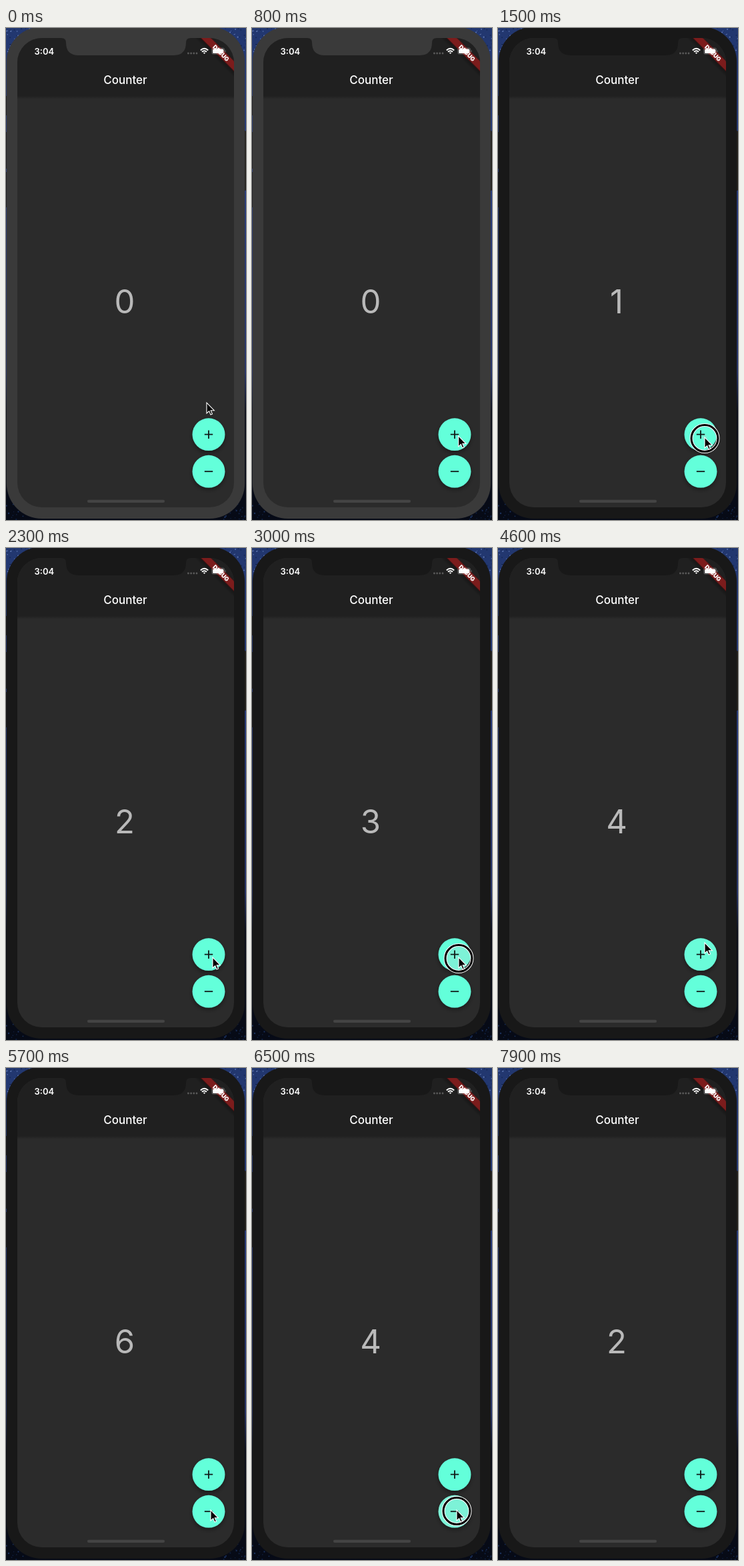
Recreate the animation shown at these times as an HTML page. Size 360 px wide and 738 px high, loop 8000 ms.

```html
<!DOCTYPE html>
<html lang="en">
<head>
<meta charset="utf-8">
<title>Counter</title>
<style>
  html, body { margin: 0; width: 100%; height: 100%; overflow: hidden; background: #050710; }
  svg { display: block; width: 100vw; height: 100vh; font-family: Inter, Roboto, sans-serif; }
  text { fill: #fff; text-anchor: middle; }
</style>
</head>
<body>
<svg viewBox="0 0 360 738">
  <defs>
    <linearGradient id="sky" x2="0" y2="1">
      <stop offset="0" stop-color="#22376f"/>
      <stop offset=".3" stop-color="#273c80"/>
      <stop offset=".7" stop-color="#27356c"/>
      <stop offset=".78" stop-color="#0a0d18"/>
      <stop offset="1" stop-color="#060a16"/>
    </linearGradient>
    <linearGradient id="barShade" x2="0" y2="1">
      <stop offset="0" stop-opacity=".25"/>
      <stop offset="1" stop-opacity="0"/>
    </linearGradient>
    <filter id="drop" x="-40%" y="-40%" width="180%" height="190%">
      <feDropShadow dx="0" dy="3" stdDeviation="3" flood-opacity=".4"/>
    </filter>
    <clipPath id="screen"><rect x="17" y="15" width="325" height="704" rx="37"/></clipPath>
    <clipPath id="disc"><circle r="24.4"/></clipPath>
  </defs>

  <rect width="360" height="738" fill="url(#sky)"/>
  <g id="stars"></g>
  <rect x="356" y="154" width="4" height="90" rx="1.5" fill="#25221f"/>
  <g fill="#1b1b20">
    <rect y="102" width="2" height="29"/>
    <rect y="156" width="2" height="55"/>
    <rect y="216" width="2" height="53"/>
  </g>
  <rect class="bezel" x=".8" y="-2" width="357.4" height="738" rx="53"/>

  <g clip-path="url(#screen)">
    <rect x="17" y="15" width="325" height="704" fill="#2b2b2b"/>
    <rect x="17" y="15" width="325" height="87" fill="#202020"/>
    <rect x="17" y="102" width="325" height="5" fill="url(#barShade)"/>
    <g transform="translate(322.5 37.5) rotate(45)">
      <rect x="-60" y="-5.2" width="120" height="10.4" fill="#7b1a1d" filter="url(#drop)"/>
      <text y="3.2" font-size="8.8" font-weight="900">DEBUG</text>
    </g>
    <rect x="122" y="707.7" width="116" height="4.3" rx="2.1" fill="#444"/>
  </g>
  <path class="bezel" d="M83 14H277V15Q270 15 270 22Q270 41 251 41H109Q90 41 90 22Q90 15 83 15Z"/>

  <text x="57.3" y="39.5" font-size="13" font-weight="600">3:04</text>
  <g fill="#5a5a5a">
    <circle cx="273.4" cy="38" r="1.4"/><circle cx="277.6" cy="38" r="1.4"/>
    <circle cx="281.8" cy="38" r="1.4"/><circle cx="286" cy="38" r="1.4"/>
  </g>
  <g fill="none" stroke="#fff" stroke-width="2">
    <path d="M291.8 33.4Q297.5 28.2 303.2 33.4M294 35.8Q297.5 32.6 301 35.8"/>
    <path d="M295.7 37L297.5 39L299.3 37Q297.5 35.8 295.7 37Z" fill="#fff" stroke="none"/>
  </g>
  <rect x="308.6" y="30.2" width="19.2" height="9" rx="2.6" fill="none" stroke="#fff" stroke-opacity=".4" stroke-width=".8"/>
  <rect x="310" y="31.5" width="16.4" height="6.4" rx="1.5" fill="#fff"/>
  <path d="M328.8 33.2Q330.6 34.7 328.8 36.2Z" fill="#fff" opacity=".5"/>

  <text x="179" y="83.5" font-size="17" font-weight="500">Counter</text>
  <text id="count" x="178" y="428" font-size="49" style="fill:#b9b9b9">0</text>
  <g id="buttons"></g>

  <g id="ring" fill="none">
    <circle cy="1.5" r="20" stroke="#fff" stroke-width="5"/>
    <circle cy="1.5" r="20" stroke="#000" stroke-width="3"/>
  </g>
  <path id="cursor" d="M0 0V16L3.7 12.6L6 18L8.5 17L6.2 11.7H11.3Z" stroke="#fff" stroke-width="1.1"/>
</svg>

<script>
const LOOP = 8000, HOLD = 150, FADE = 400;
const $ = id => document.getElementById(id);

// [press time, change of the count]
const taps = [
  [1000, 1], [1480, 1], [2420, 1], [2900, 1], [3420, -1], [4150, 1],
  [4680, 1], [5080, 1], [5760, -1], [6060, -1], [6360, -1], [6640, -1]
];
// [time, x, y] of the pointer
const path = [
  [100, 301, 562], [900, 310, 614], [3050, 310, 614], [3350, 307, 655],
  [3750, 307, 655], [4080, 310, 592], [5300, 310, 592], [5620, 307, 663],
  [6850, 307, 663], [7130, 350, 750]
];

function pointer(t) {
  const i = path.findIndex(p => p[0] > t);
  if (i < 0) return path[path.length - 1].slice(1);
  if (i === 0) return path[0].slice(1);
  const [a, b] = [path[i - 1], path[i]];
  const u = (t - a[0]) / (b[0] - a[0]), e = u * u * (3 - 2 * u);
  return [a[1] + (b[1] - a[1]) * e, a[2] + (b[2] - a[2]) * e];
}

// Stars show only around the corners of the phone.
let seed = 11;
const rnd = () => (seed = seed * 16807 % 2147483647) / 2147483647;
let stars = "";
for (let i = 0; i < 180; i++) {
  const x = rnd() < .5 ? rnd() * 36 : 360 - rnd() * 36;
  const low = rnd() < .5, y = low ? 690 + rnd() * 48 : rnd() * 40;
  const color = low ? (rnd() < .5 ? "#1b315c" : "#10203f") : (rnd() < .4 ? "#5f78b5" : "#182a58");
  stars += `<circle cx="${x}" cy="${y}" r="${.4 + rnd() * .9}" fill="${color}"/>`;
}
$("stars").innerHTML = stars;

const buttons = [
  { sign: 1, y: 609.7, icon: "M-6.2 0H6.2M0 -6.2V6.2" },
  { sign: -1, y: 665.2, icon: "M-6.2 0H6.2" }
];
$("buttons").innerHTML = buttons.map(b => `<g transform="translate(304 ${b.y})">
  <circle r="24.4" fill="#64ffda" filter="url(#drop)"/>
  <g clip-path="url(#disc)"><circle class="ink" fill="#ccc"/></g>
  <path d="${b.icon}" stroke="#101a18" stroke-width="1.8"/></g>`).join("");
const inks = document.querySelectorAll(".ink");
const bezels = document.querySelectorAll(".bezel");

function draw(now) {
  const t = now % LOOP, [x, y] = pointer(t);
  const at = `translate(${x} ${y})`;
  $("cursor").setAttribute("transform", at);
  $("ring").setAttribute("transform", at);
  $("ring").style.display = taps.some(([d]) => t >= d && t < d + 200) ? "" : "none";
  $("count").textContent = taps.reduce((n, [d, step]) => t >= d + HOLD ? n + step : n, 0);
  bezels.forEach(b => b.setAttribute("fill", t < 1000 ? "#3a3a3a" : "#181818"));

  buttons.forEach((b, i) => {
    const tap = taps.filter(([d, step]) => step === b.sign && d <= t).pop();
    const age = tap ? t - tap[0] : LOOP;
    const fade = Math.max(0, 1 - Math.max(0, age - HOLD) / FADE);
    const [px, py] = tap ? pointer(tap[0]) : [304, b.y];
    const ink = inks[i];
    ink.setAttribute("cx", px - 304);
    ink.setAttribute("cy", py - b.y);
    ink.setAttribute("r", Math.min(48, age * .2));
    ink.setAttribute("opacity", .25 * fade);
  });
}

const start = performance.now();
function tick() {
  draw(performance.now() - start);
  requestAnimationFrame(tick);
}
tick();
</script>
</body>
</html>
```
